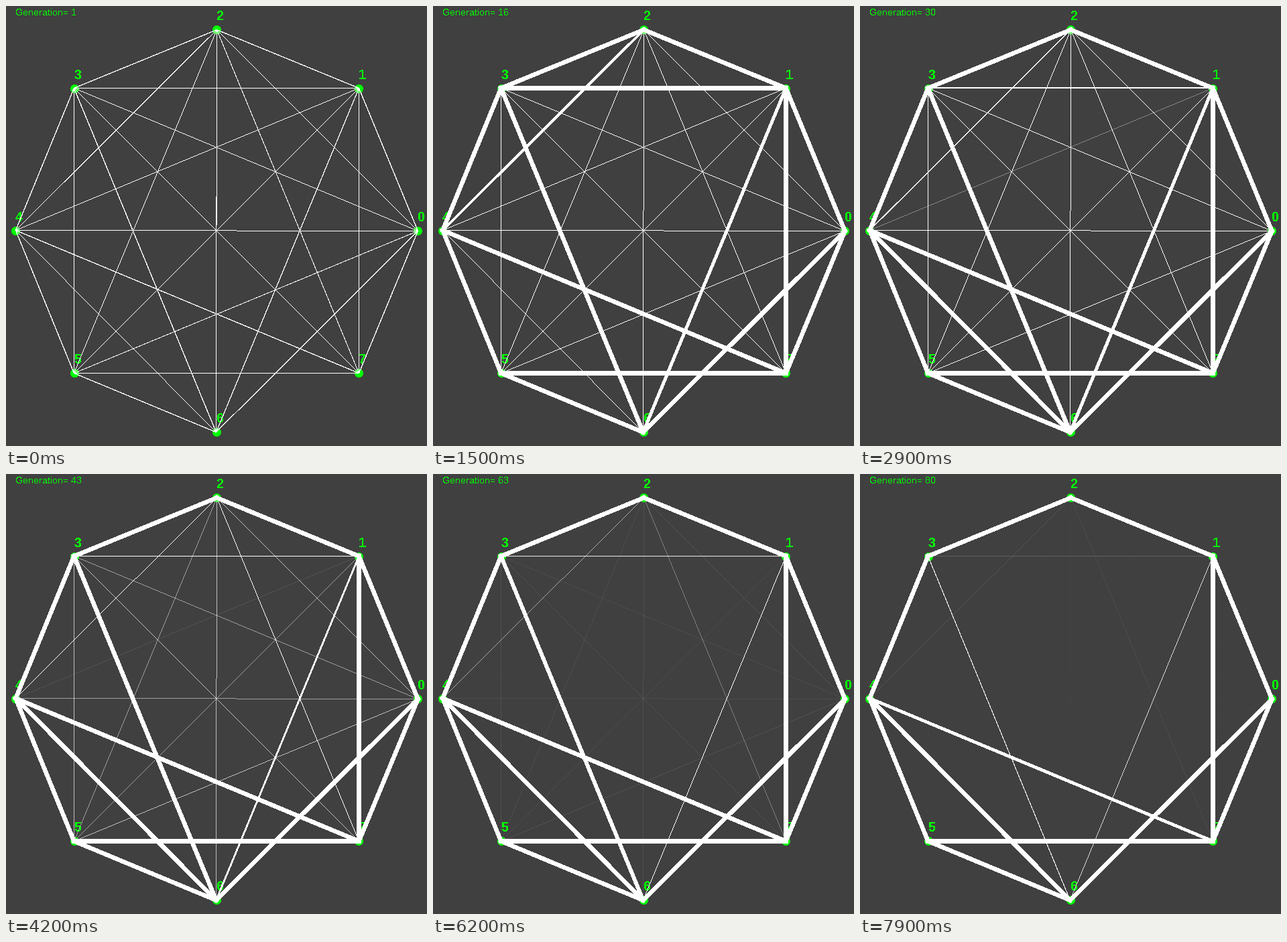
Recreate the animation shown at these times as a matplotlib script. Size 628 by 656 pixels, loop 8000 ms.

```python
import math
from itertools import combinations

import numpy as np
import matplotlib.pyplot as plt
from matplotlib.animation import FuncAnimation
from matplotlib.patches import Circle

W, H, DPI = 628, 656, 64
PX = 72 / DPI  # points per pixel
FRAMES, STEP = 80, 100
CX, CY, R = 314, 335, 300
GREEN, BACK = "#00ff00", "#404040"

CAP = 6.6     # widest trail
DECAY = 0.1   # evaporation per generation
RAMP = 7      # generations a trail needs to build up

plt.rcParams.update({
    "font.family": "Liberation Sans",
    "text.antialiased": False,
    "text.hinting": "native",
    "text.hinting_factor": 1,
})


def evaporate(t, start):
    return math.exp(-DECAY * max(0, t - start))


class Trail:
    """A trail builds up from birth, is used until busy, then evaporates.

    Its faint base stays one pixel wide and starts to pale at fade.
    """

    def __init__(self, peak=1, busy=0, fade=35, birth=0):
        self.peak, self.busy, self.fade, self.birth = peak, busy, fade, birth

    def strength(self, t):
        u = min(max((t + 0.5 - self.birth) / RAMP, 0), 1)
        used = (1 + (self.peak - 1) * u) * evaporate(t, self.busy)
        return max(used, evaporate(t, self.fade))


KEPT = Trail(CAP, FRAMES)
TRIED = Trail(2, 6, 38)
TRAILS = {
    **dict.fromkeys(["01", "12", "23", "34", "45", "56", "07"], KEPT),
    **dict.fromkeys(["06", "17", "57"], KEPT),
    **dict.fromkeys(["02", "05", "26", "35", "37"], TRIED),
    "46": Trail(CAP, FRAMES, birth=18),
    "47": Trail(CAP, 76),
    "36": Trail(CAP, 61),
    "16": Trail(5, 36, 77),
    "24": Trail(4, 19, 56),
    "13": Trail(CAP, 17, 61),
    "27": Trail(2, 6, 51),
    "14": Trail(fade=19),
}


def node(i):
    a = i * math.pi / 4
    return CX + R * math.cos(a), CY - R * math.sin(a)


def width_field(p, q):
    """Line width at which each pixel becomes part of the line p-q.

    Ends are square caps. Also returns the width of a one-pixel line.
    """
    (x0, y0), (x1, y1) = p, q
    length = math.hypot(x1 - x0, y1 - y0)
    ux, uy = (x1 - x0) / length, (y1 - y0) / length
    gy, gx = np.ogrid[:H, :W]
    dx, dy = gx - x0 + 0.05, gy - y0 + 0.05
    along = dx * ux + dy * uy
    off = np.maximum(np.abs(dx * uy - dy * ux),
                     np.abs(along - length / 2) - length / 2)
    return (2 * off).astype(np.float32), max(abs(ux), abs(uy))


fig = plt.figure(figsize=(W / DPI, H / DPI), dpi=DPI, facecolor=BACK)
ax = fig.add_axes([0, 0, 1, 1])
ax.axis("off")

nodes = [node(i) for i in range(8)]
for i, (x, y) in enumerate(nodes):
    x, y = round(x), round(y)
    ax.add_patch(Circle((x + 0.5, y + 0.5), 6.5, fc=GREEN, lw=0, zorder=1))
    ax.text(x, y - 14, str(i), color=GREEN, size=20 * PX, weight="bold",
            va="baseline", zorder=2)

# Line ends sit on whole pixels, cut down from the exact corners.
corners = [(int(x), int(y)) for x, y in nodes]
edges = [(TRAILS.get(f"{i}{j}", Trail()), *width_field(corners[i], corners[j]))
         for i, j in combinations(range(8), 2) if (i, j) != (6, 7)]

web = np.full((H, W, 4), 255, np.uint8)
picture = ax.imshow(web, extent=(0, W, H, 0), aspect="auto",
                    interpolation="nearest", zorder=3)
caption = ax.text(14, 14, "", color=GREEN, size=14 * PX, va="baseline", zorder=4)
ax.set_xlim(0, W)
ax.set_ylim(H, 0)


def draw(n):
    cover = np.zeros((H, W), np.float32)
    for trail, field, thin in edges:
        v = trail.strength(n)
        lit = field < (v if v > 1 else thin)
        cover[lit] += (1 - cover[lit]) * min(v, 1)
    web[..., 3] = np.round(255 * cover)
    picture.set_data(web)
    caption.set_text(f"Generation= {n + 1}")
    return picture, caption


anim = FuncAnimation(fig, draw, frames=FRAMES, interval=STEP,
                     repeat=True, repeat_delay=0, blit=False)
plt.show()
```
